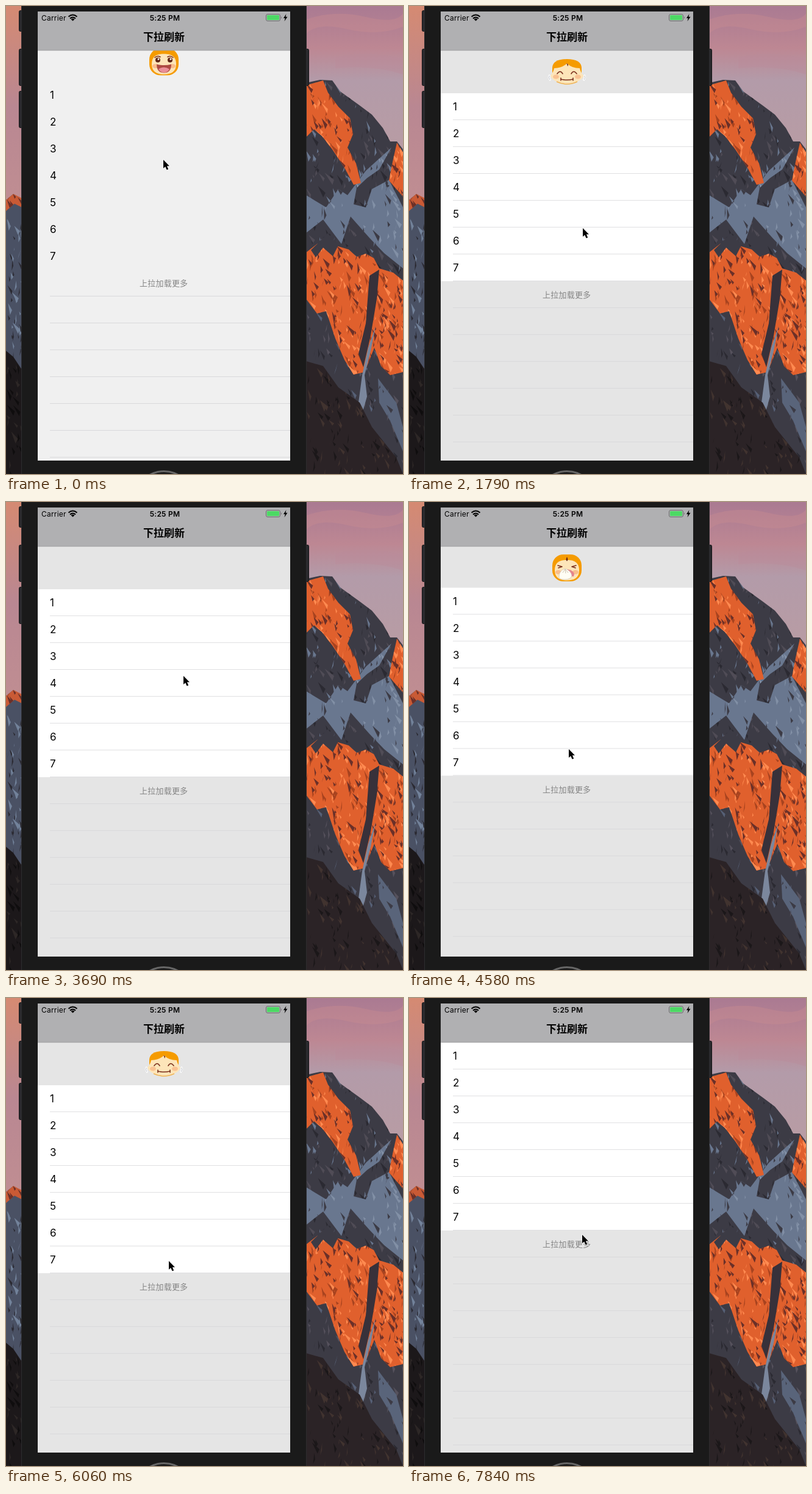
These frames come from a looping animation (651x767 px, 7990 ms). An HTML page:

```html
<!DOCTYPE html>
<html lang="zh-CN">
<head>
<meta charset="utf-8">
<title>下拉刷新</title>
<style>
  html, body { margin: 0; width: 100%; height: 100%; overflow: hidden; background: #1a1a1a; }
  svg { display: block; }
  text { font-family: Inter, "Noto Sans CJK SC", "Noto Sans CJK", sans-serif; }
  .line { fill: none; stroke: #7a2f1c; stroke-width: 1.6; stroke-linecap: round; stroke-linejoin: round; }
</style>
</head>
<body>
<svg width="651" height="767" viewBox="0 0 651 767">
  <defs>
    <linearGradient id="sky" x2="0" y2="1">
      <stop offset="0" stop-color="#aa7a92"/><stop offset=".09" stop-color="#bd8793"/>
      <stop offset=".16" stop-color="#b39ba9"/><stop offset=".3" stop-color="#b89ca4"/>
    </linearGradient>
    <linearGradient id="glow" x2="0" y2="1">
      <stop offset="0" stop-color="#d58a72"/><stop offset=".5" stop-color="#b98792"/>
      <stop offset="1" stop-color="#c08e92"/>
    </linearGradient>
    <clipPath id="screen"><rect x="52" y="73" width="414" height="672"/></clipPath>
  </defs>

  <rect width="651" height="767" fill="url(#sky)"/>
  <rect width="26" height="330" fill="url(#glow)"/>
  <path d="M492 22Q540 6 590 18T651 12V34Q610 50 560 38T492 46Z" fill="#c58a90" opacity=".45"/>
  <path d="M540 84Q600 70 651 88V112Q600 96 540 102Z" fill="#b98a98" opacity=".4"/>
  <g id="landscape"></g>

  <g id="device">
    <g fill="#29292d" stroke="#151517">
      <rect x="21.5" y="7.5" width="8" height="34" rx="2"/>
      <rect x="21.5" y="70.5" width="8" height="60" rx="2"/>
      <rect x="21.5" y="139.5" width="8" height="60" rx="2"/>
      <rect x="488.500" y="70.5" width="8" height="60" rx="2"/>
    </g>
    <rect x="25.5" y="-5" width="467" height="780" fill="#1a1a1a" stroke="#2d2d2f"/>
    <circle cx="259" cy="810.5" r="48" fill="none" stroke="#666" stroke-width="3"/>
  </g>

  <g clip-path="url(#screen)">
    <rect id="backdrop" x="52" y="73" width="414" height="672"/>
    <g id="list">
      <rect id="cells" x="52" y="73" width="414" height="308" fill="#fff"/>
      <g id="cellLines" fill="#e0e0e2"></g>
      <g id="emptyLines" fill="#d9d9db"></g>
      <g id="digits" font-size="17"></g>
      <text x="258.700" y="408" font-size="13" letter-spacing=".2" text-anchor="middle" fill="#858585">上拉加载更多</text>
      <g id="face">
        <g id="round">
          <rect x="-24" y="-22" width="48" height="44" rx="18" fill="#f59b00"/>
          <path d="M-20 4C-20-9-12-13 0-13S20-9 20 4C20 16 12 20.500 0 20.500S-20 16-20 4Z" fill="#fde5b9"/>
          <ellipse cx="-14" cy="7" rx="5" ry="3.5" fill="#f9bd8c"/>
          <ellipse cx="14" cy="7" rx="5" ry="3.5" fill="#f9bd8c"/>
          <g id="open">
            <g fill="#5e2516"><circle cx="-10" cy="-3" r="4"/><circle cx="10" cy="-3" r="4"/></g>
            <g fill="#fff"><circle cx="-9" cy="-4.500" r="1.500"/><circle cx="11" cy="-4.500" r="1.500"/></g>
            <path class="line" d="M-15-7Q-11-11-6-8M15-7Q11-11 6-8"/>
            <path d="M-12 4Q0 7 12 4Q12 18 0 18T-12 4Z" fill="#ad4a42"/>
            <path d="M-9 12Q0 6 9 12Q6 17.500 0 17.500T-9 12Z" fill="#eb8f98"/>
          </g>
          <g id="bun">
            <path d="M0-18Q3-13 0-11Q-3-13 0-18Z" fill="#6b2918"/>
            <path class="line" d="M-15-4L-8-2L-14 0M15-4L8-2L14 0"/>
            <path d="M0 2Q11 4 12 10L11 14H3Z" fill="#e5838b"/>
            <path d="M-13 14Q-13 5-3 1Q7 5 8 13Q6 19-4 19T-13 14Z" fill="#fffdf4" stroke="#d5cbb8" stroke-width=".8"/>
            <path d="M-3 2L-7 8M-3 2L-2 9M-3 2L2 8" fill="none" stroke="#cfc5b2"/>
          </g>
        </g>
        <g id="smile">
          <path d="M-28 5Q-31 9-27 14M28 5Q31 9 27 14" fill="none" stroke="#fff" stroke-width="3"/>
          <path d="M-28.500 6Q-31 9-28 13M28.500 6Q31 9 28 13" fill="none" stroke="#bfc3ca"/>
          <path d="M-24 4V-7Q-23-21 0-21T24-7V4Z" fill="#f59b00"/>
          <path d="M-21-6Q-8-6 0-14Q8-6 21-6Q22 0 27 6Q25 16 0 20.500Q-25 16-27 6Q-22 0-21-6Z" fill="#fde5b9"/>
          <path d="M-17 16Q0 24 17 16" fill="none" stroke="#efb455" stroke-width="1.500"/>
          <ellipse cx="-18" cy="8" rx="5" ry="3.500" fill="#f9c292"/>
          <ellipse cx="18" cy="8" rx="5" ry="3.500" fill="#f9c292"/>
          <path class="line" d="M-16 3Q-11-4-7 3M16 3Q11-4 7 3M-10 10V14M10 10V14M-10 12Q0 14.500 10 12"/>
          <path d="M-1-14Q4-13 1-9Q1-12-1-14Z" fill="#6b2918"/>
        </g>
      </g>
    </g>
  </g>

  <g id="navigation">
    <rect x="52" y="9" width="414" height="64" fill="#b0b0b2"/>
    <rect x="52" y="72.500" width="414" height=".7" fill="#9c9c9e"/>
    <text x="58" y="24" font-size="12" letter-spacing=".2">Carrier</text>
    <text x="260.500" y="24" font-size="12" font-weight="600" letter-spacing=".25" text-anchor="middle">5:25 PM</text>
    <text x="259" y="57" font-size="17" font-weight="700" text-anchor="middle">下拉刷新</text>
    <g fill="none" stroke="#000" stroke-width="2">
      <path d="M102.500 17.500Q109.500 11.500 116.500 17.500M105 20.500Q109.500 16.500 114 20.500"/>
    </g>
    <path d="M106.500 21.700Q109.500 19.500 112.500 21.700L109.500 24.500Z"/>
    <rect x="426.500" y="13.500" width="23" height="11" rx="2.500" fill="none" stroke="#6c6c6e"/>
    <rect x="428" y="15" width="20" height="8" rx="1" fill="#4cd964"/>
    <path d="M451 17Q453 19 451 21Z" fill="#6c6c6e"/>
    <path d="M459.500 13L455 20H457.700L456.500 25L461.500 17.700H458.500Z"/>
  </g>

  <path id="cursor" d="M0 0V14L3.200 11.200L5.600 16.500L8.200 15.400L5.900 10.200H10Z" stroke="#fff" stroke-width="1.200" paint-order="stroke"/>
</svg>
<script>
const $ = id => document.getElementById(id);

function add(parent, tag, attributes, text = '') {
  const node = document.createElementNS('http://www.w3.org/2000/svg', tag);
  for (const [name, value] of Object.entries(attributes)) node.setAttribute(name, value);
  node.textContent = text;
  parent.append(node);
  return node;
}

let seed = 7;
const random = () => (seed = seed * 16807 % 2147483647) / 2147483647;

// A flat slope, roughened by slanted flecks clipped to its outline.
function slope(outline, color, fleckColors = [], count = 0) {
  const land = $('landscape');
  const shape = add(land, 'path', { d: outline, fill: color });
  if (!count) return;
  const { x, y, width, height } = shape.getBBox();
  const id = 'slope' + land.children.length;
  add(add(land, 'clipPath', { id }), 'path', { d: outline });
  const group = add(land, 'g', { 'clip-path': `url(#${id})` });
  for (const fill of fleckColors) {
    let d = '';
    for (let i = 0; i < count; i++) {
      const length = 5 + random() * 15, lean = (random() - .35) * length;
      d += `M${x + random() * width} ${y + random() * height}l${lean} ${length}l${1 + random() * 3} ${-length * .4}z`;
    }
    add(group, 'path', { d, fill });
  }
}

const SLATE = '#3c3b45', SNOW = '#69778f', EMBER = '#e0602d';
const emberFlecks = ['#a8431f', '#ff8a50', '#6b3028'];
slope('M492 126L515 121L535 122L548 140L580 163L600 178L618 200L630 222L641 222L651 235V460H492Z', SLATE, ['#2b2a32', SNOW, '#504c56'], 90);
slope('M632 232L612 268L592 282L575 298L570 325L590 330L600 300L628 285L651 330V430L620 405L596 380L565 345L550 390L520 350L492 372V310L525 330L545 300L560 310L590 270Z', SNOW, [SLATE, '#8290a6'], 55);
slope('M492 130L520 122L528 142L545 165L564 184L569 210L560 232L574 258L582 290L570 293L555 265L535 235L518 213L505 202L492 215Z', EMBER, emberFlecks, 40);
slope('M641 224L651 240V312L640 300L628 286L634 255Z', EMBER, emberFlecks, 12);
slope('M492 402L510 388L528 373L545 392L562 398L575 411L590 405L603 412L612 430L635 437L651 450V767H492Z', SLATE, ['#2b2a32', '#55515c', '#566076'], 80);
slope('M492 404L510 390L528 386L545 394L562 399L575 411L590 406L603 413L612 430L635 437L651 450V600L630 605L615 590L604 560L588 600L570 604L555 580L540 545L525 500L510 504L492 480Z', EMBER, emberFlecks, 110);
slope('M528 373L545 392L536 410L520 396L508 412L500 400Z', SLATE);
slope('M596 442L612 432L608 480L598 540L586 592L578 570L590 520Z', '#38313a');
slope('M606 525L598 565L588 605L592 640L582 675L578 650L584 605L594 560Z', '#7b879d');
slope('M610 610L640 650L651 690V730L630 680L612 650Z', '#59647a', [SLATE], 20);
slope('M492 582L520 590L545 625L580 650L600 690L620 715L640 740L651 767H492Z', '#2b2326', ['#1b1719', '#41332f'], 65);
slope('M0 318L12 308L26 316V600H0Z', '#4a5164', ['#2b2a32', '#72829a'], 24);
slope('M0 318L12 308L26 315V330L14 324L0 336Z', '#c95a35', ['#6b3028'], 8);
slope('M0 565L12 575L26 596V767H0Z', '#1c181a', ['#0f0d0e', '#2d2726'], 16);

for (let i = 1; i <= 16; i++) {
  const y = 72 + 44 * i;
  add($(i <= 7 ? 'cellLines' : 'emptyLines'), 'rect', { x: 72, y, width: 394, height: 1 });
  if (i <= 7) add($('digits'), 'text', { x: 72, y: y - 15 }, i);
}

const LOOP = 7990, STEP = 148, LAST_STEP = 53;
// Keys are [step, value, ...].
const pullKeys = [[0, 51], [8, 98], [9, 98], [11, 70], [25, 70], [27.7, 0], [28.5, 0], [31, 67.5],
  [32, 78], [33, 79], [35, 71.5], [36, 70], [47, 70], [49.7, 0]];
const cursorKeys = [[0, 258, 252], [8, 285, 364], [12, 285, 364], [17, 290, 298], [25, 291, 285],
  [28.5, 266, 272], [31, 262, 405], [32.5, 267, 431], [48, 267, 431], [53, 284, 388]];

function sample(keys, step) {
  const next = keys.findIndex(key => key[0] > step);
  if (next < 0) return keys.at(-1).slice(1);
  const from = keys[next - 1], to = keys[next];
  const u = (step - from[0]) / (to[0] - from[0]), eased = u * u * (3 - 2 * u);
  return from.slice(1).map((value, i) => value + (to[i + 1] - value) * eased);
}

const show = (id, visible) => $(id).setAttribute('display', visible ? 'inline' : 'none');
const transform = (id, value) => $(id).setAttribute('transform', value);

function render(time) {
  const step = Math.min(LAST_STEP, Math.floor(time % LOOP / STEP + .08));
  const [pull] = sample(pullKeys, step);
  const [x, y] = sample(cursorKeys, step);
  const pale = step < 9;
  const smiling = pull >= 70;
  const finished = step >= 25 && step < 29 || step > 47;

  transform('list', `translate(0 ${pull})`);
  transform('cursor', `translate(${x} ${y})`);
  $('backdrop').setAttribute('fill', pale ? '#f0f0f0' : '#e5e5e5');
  show('cells', !pale);
  show('cellLines', !pale);

  show('face', !finished);
  show('smile', smiling);
  show('round', !smiling);
  show('open', pull < 58);
  show('bun', pull >= 58);
  const size = Math.min(1, pull / 45);
  const chew = smiling && step % 3 === 1 ? 'scale(.95 1.03)' : '';
  transform('face', `translate(259 ${smiling ? 38 : 40.5}) scale(${size}) ${chew}`);
}

function tick() {
  render(performance.now());
  requestAnimationFrame(tick);
}
tick();
</script>
</body>
</html>
```
